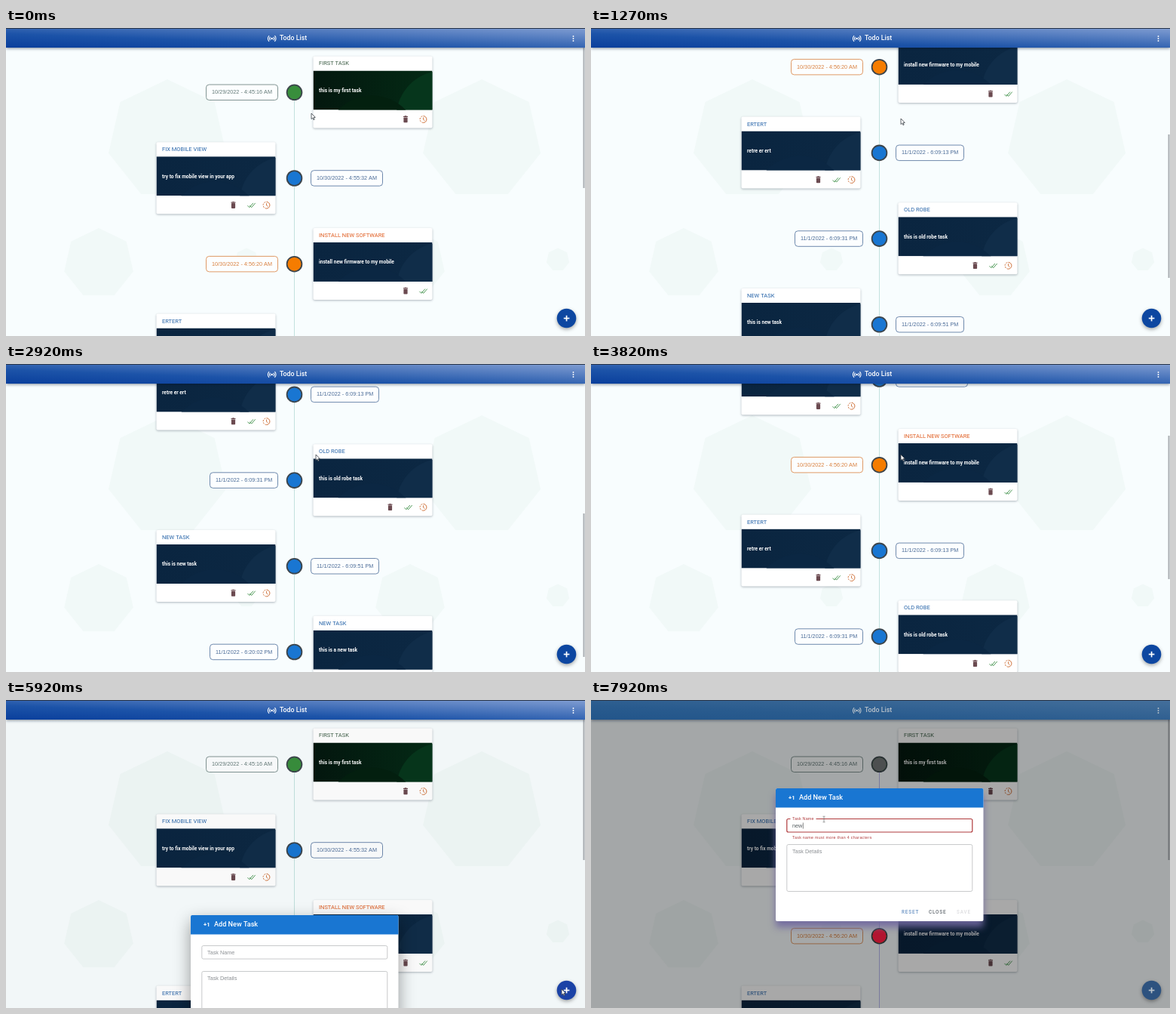
An HTML page with a canvas for the animation above (8 s loop, 768x408 px).

```html
<!DOCTYPE html>
<html lang="en">
<head>
<meta charset="utf-8">
<title>Todo List</title>
<style>
html, body { margin: 0; width: 100%; height: 100%; overflow: hidden; background: #f8fdfe; }
canvas { display: block; width: 768px; height: 408px; }
</style>
</head>
<body>
<canvas id="stage" width="768" height="408"></canvas>
<script>
const W = 768, H = 408, LOOP = 8000;
const ctx = document.getElementById('stage').getContext('2d');
const SANS = '"Liberation Sans", Arial, sans-serif';
const ROBOTO = 'Roboto, "Liberation Sans", sans-serif';

const GREEN = { dot: '#388e3c', title: '#3f5f48', date: '#647a78', dimDot: '#4d4f50' };
const BLUE = { dot: '#1976d2', title: '#2563a8', date: '#4c6c98', dimDot: '#1a4f86' };
const ORANGE = { dot: '#f57c00', title: '#df5a1d', date: '#d9803f', dimDot: '#b3142f' };

const TASKS = [
  { title: 'FIRST TASK', text: 'this is my first task', date: '10/29/2022 - 4:45:16 AM', hue: GREEN, icons: 'tc' },
  { title: 'FIX MOBILE VIEW', text: 'try to fix mobile view in your app', date: '10/30/2022 - 4:55:32 AM', hue: BLUE, icons: 'tdc' },
  { title: 'INSTALL NEW SOFTWARE', text: 'install new firmware to my mobile', date: '10/30/2022 - 4:56:20 AM', hue: ORANGE, icons: 'td' },
  { title: 'ERTERT', text: 'retre er ert', date: '11/1/2022 - 6:09:13 PM', hue: BLUE, icons: 'tdc' },
  { title: 'OLD ROBE', text: 'this is old robe task', date: '11/1/2022 - 6:09:31 PM', hue: BLUE, icons: 'tdc' },
  { title: 'NEW TASK', text: 'this is new task', date: '11/1/2022 - 6:09:51 PM', hue: BLUE, icons: 'tdc' },
  { title: 'NEW TASK', text: 'this is a new task', date: '11/1/2022 - 6:20:02 PM', hue: BLUE, icons: 'tdc' }
];

// [time, scroll offset, scrollbar lead]
const SCROLL = [[0, 0], [200, 36], [360, 80], [740, 105], [910, 152], [1090, 206], [1270, 261], [1440, 300],
  [1800, 362], [1980, 430], [2920, 386], [3290, 330], [3450, 265], [3820, 179, 19], [4100, 100, 20], [4380, 28, 28], [4930, 0]];
// [time, x, y]
const POINTER = [[0, 405, 113], [200, 411, 120], [5110, 470, 170], [5290, 590, 275], [5470, 695, 355],
  [5640, 737, 383], [6580, 640, 350], [6710, 510, 303], [7460, 309, 158]];
// [time, dialog top, backdrop opacity]
const DIALOG = [[0, H, 0], [5920, 285, 0.025], [6090, 145, 0.22], [6270, 117, 0.34]];

const stepAt = (list, t) => list.filter(row => row[0] <= t).pop();

function text(str, x, y, size, color, family = SANS, weight = 400, spacing = 0) {
  ctx.font = `${weight} ${size}px ${family}`;
  ctx.letterSpacing = spacing + 'px';
  ctx.fillStyle = color;
  ctx.fillText(str, x, y);
}

function rect(x, y, w, h, color) {
  ctx.fillStyle = color;
  ctx.fillRect(x, y, w, h);
}

function disc(x, y, r, color) {
  ctx.fillStyle = color;
  ctx.beginPath();
  ctx.arc(x, y, r, 0, 7);
  ctx.fill();
}

function rounded(x, y, w, h, r, fill, stroke, line = 1) {
  ctx.beginPath();
  ctx.roundRect(x, y, w, h, r);
  if (fill) { ctx.fillStyle = fill; ctx.fill(); }
  if (stroke) { ctx.strokeStyle = stroke; ctx.lineWidth = line; ctx.stroke(); }
}

function path(points, color, width) {
  ctx.beginPath();
  points.forEach(([x, y]) => ctx.lineTo(x, y));
  ctx.strokeStyle = color;
  ctx.lineWidth = width;
  ctx.stroke();
}

function withShadow(color, blur, dy, draw) {
  ctx.save();
  ctx.shadowColor = color;
  ctx.shadowBlur = blur;
  ctx.shadowOffsetY = dy;
  draw();
  ctx.restore();
}

function heptagon(cx, cy, r) {
  ctx.beginPath();
  for (let i = 0; i < 7; i++) {
    const a = i * Math.PI * 2 / 7;
    ctx.lineTo(cx + r * Math.sin(a), cy - r * Math.cos(a));
  }
  ctx.fillStyle = '#f1f9f8';
  ctx.fill();
}

function backdropShapes() {
  rect(0, 0, W, H, '#f8fdfe');
  for (const dx of [0, 413]) {
    heptagon(214 + dx + dx / 100, 148, 80);
    heptagon(123 + dx, 312, 47);
    heptagon(319 + dx, 307, 15.5);
  }
}

const ICONS = {
  t(x, y) {
    rect(x - 3, y - 4.2, 6, 1.2, '#6b4a50');
    rect(x - 1.2, y - 4.8, 2.4, 1, '#6b4a50');
    rounded(x - 2.6, y - 2.6, 5.2, 6.8, 0.8, '#6b4a50');
  },
  d(x, y) {
    path([[x - 5, y + 0.5], [x - 2.6, y + 3], [x + 2.4, y - 2.8]], '#4f9a58', 1);
    path([[x - 2.2, y + 0.5], [x + 0.2, y + 3], [x + 5.2, y - 2.8]], '#4f9a58', 1);
  },
  c(x, y) {
    ctx.strokeStyle = '#cf7038';
    ctx.lineWidth = 1;
    ctx.beginPath();
    ctx.arc(x, y, 4.4, -Math.PI / 2, Math.PI / 2);
    ctx.stroke();
    ctx.setLineDash([2, 1.4]);
    ctx.beginPath();
    ctx.arc(x, y, 4.4, Math.PI / 2, Math.PI * 1.5);
    ctx.stroke();
    ctx.setLineDash([]);
    path([[x, y - 2.6], [x, y + 0.3], [x + 2, y + 1.7]], '#cf7038', 0.9);
  }
};

function banner(x, y, green) {
  const [from, to, glow] = green ? ['#03170e', '#042a15', '#06361c'] : ['#0a2540', '#0c2843', '#102d49'];
  const fill = ctx.createLinearGradient(x, 0, x + 158, 0);
  fill.addColorStop(0, from);
  fill.addColorStop(1, to);
  ctx.save();
  ctx.beginPath();
  ctx.rect(x, y, 158, 52);
  ctx.clip();
  rect(x, y, 158, 52, fill);
  disc(x + 172, y + 62, 62, glow);
  disc(x + 78, y + 95, 62, green ? '#03200f' : '#0b2743');
  ctx.restore();
}

function task(item, index, scroll, dimmed) {
  const y = 85 + index * 113.7 - scroll;
  if (y < -60 || y > H + 60) return;
  const onRight = index % 2 === 0;
  const x = onRight ? 407.5 : 199.5;
  const { hue } = item;

  withShadow('rgba(0,20,40,.3)', 3, 1, () => rounded(x, y - 47.5, 158, 95, 2, '#fff'));
  text(item.title, x + 7.5, y - 37.8, 7.5, hue.title, ROBOTO);
  banner(x, y - 28.5, hue === GREEN);
  text(item.text, x + 7.5, y - 2, 6.6, '#fff', ROBOTO, 700);

  const offsets = item.icons.length === 3 ? [56, 32, 12] : [35.5, 12];
  [...item.icons].forEach((name, i) => ICONS[name](x + 158 - offsets[i], y + 36));

  const width = item.date.length > 22 ? 96 : 91;
  const left = onRight ? 361 - width : 404;
  rounded(left + 0.5, y - 10, width - 1, 20.5, 4, '#fcfeff', hue.date, 0.8);
  text(item.date, left + 8, y + 0.3, 7.27, hue.date);

  if (index < TASKS.length - 1) rect(382, y + 11, 1, 92, dimmed ? '#b9b9ee' : '#c3e2df');
  disc(382.5, y + 0.3, 10.8, '#3c454c');
  disc(382.5, y + 0.3, 9, hue.dot);
}

function header(dimmed) {
  const fill = ctx.createLinearGradient(383.1, 39, 384.9, -13);
  fill.addColorStop(0, dimmed ? '#22558a' : '#0a3f9c');
  fill.addColorStop(0.35, dimmed ? '#295b8e' : '#1c53a8');
  fill.addColorStop(1, dimmed ? '#446f9b' : '#809dd2');
  withShadow('rgba(0,20,50,.5)', 4, 1, () => rect(0, 0, W, 26, fill));
  rect(0, 0, W, 1, '#2b3648');

  const ink = dimmed ? '#b9c2ca' : '#fff';
  disc(352.7, 14, 1.3, ink);
  ctx.strokeStyle = ink;
  ctx.lineWidth = 1.1;
  for (const r of [3, 5.3]) for (const a of [0, Math.PI]) {
    ctx.beginPath();
    ctx.arc(352.7, 14, r, a - 0.8, a + 0.8);
    ctx.stroke();
  }
  text('Todo List', 363, 13.8, 8.8, ink, ROBOTO, 500);
  for (const y of [11, 14, 17]) disc(752.5, y, 0.95, ink);
}

function addButton(dimmed, hovered) {
  const ink = dimmed ? '#b9c2ca' : '#fff';
  const fill = dimmed ? '#2d527f' : hovered ? '#1b42a6' : '#0d47a1';
  withShadow('rgba(0,0,0,.35)', 5, 2, () => disc(743.5, 384.5, 12.8, fill));
  rect(739.8, 383.7, 7.6, 1.7, ink);
  rect(742.7, 380.8, 1.7, 7.6, ink);
}

function dialog(top, t, dimmed) {
  const x = 245;
  const focused = t >= 7460, failed = t >= 7640, explained = t >= 7920;
  const accent = failed ? '#b03a3c' : '#1976d2';

  withShadow(dimmed ? 'rgba(112,104,160,.9)' : 'rgba(0,0,0,.4)', dimmed ? 10 : 22, 8,
    () => rounded(x, top, 275.5, 176, 2, '#fff'));
  rounded(x, top, 275.5, 25.5, [2, 2, 0, 0], '#1976d2');
  text('+1', 262, top + 12.5, 7.6, '#fff', ROBOTO, 700);
  text('Add New Task', 276, top + 12.4, 9.1, '#fff', ROBOTO, 500);

  rounded(259.8, top + 40.5, 246, 17.5, 2, null, focused ? accent : '#c2c4c6', focused ? 1.2 : 0.9);
  if (focused) {
    rect(264.5, top + 38, 34, 5, '#fff');
    text('Task Name', 267, top + 40.3, 5.4, accent, SANS, 400, 0.2);
    const value = explained ? 'new' : failed ? 'n' : '';
    text(value, 267, top + 50, 7.3, '#555c60');
    rect(267.5 + ctx.measureText(value).width, top + 45.5, 0.7, 8, '#555');
  } else {
    text('Task Name', 267, top + 49.8, 7.25, '#8c9094');
  }
  if (explained) text('Task name must more than 4 characters', 267, top + 65.3, 5.3, '#b03a3c', SANS, 400, 0.3);

  rounded(259.8, top + 74.5, 246, 62, 2, null, '#c2c4c6', 0.9);
  text('Task Details', 267, top + 83.6, 7.3, '#8c9094');
  const button = (label, left, color) => text(label, left, top + 164.5, 6.3, color, ROBOTO, 500, 0.9);
  button('RESET', 412, '#6a93c4');
  button('CLOSE', 448, '#666d74');
  button('SAVE', 485, '#dcdcdf');
}

function pointer(x, y, typing) {
  if (typing) {
    path([[x, y - 3.5], [x, y + 3.5]], '#777', 0.8);
    path([[x - 1.5, y - 3.8], [x + 1.5, y - 3.8]], '#777', 0.7);
    path([[x - 1.5, y + 3.8], [x + 1.5, y + 3.8]], '#777', 0.7);
    return;
  }
  ctx.beginPath();
  [[0, 0], [0, 7.6], [1.8, 6], [3, 8.7], [4.2, 8.1], [3, 5.6], [5.3, 5.4]]
    .forEach(([dx, dy]) => ctx.lineTo(x + dx, y + dy));
  ctx.closePath();
  ctx.fillStyle = '#fff';
  ctx.fill();
  ctx.strokeStyle = '#3a4048';
  ctx.lineWidth = 0.8;
  ctx.stroke();
}

function render(t) {
  const [, scroll, lead = 0] = stepAt(SCROLL, t);
  const [, px, py] = stepAt(POINTER, t);
  const [, top, dim] = stepAt(DIALOG, t);
  const dimmed = dim > 0.1;

  ctx.textBaseline = 'middle';
  backdropShapes();
  TASKS.forEach((item, i) => task(item, i, scroll, dimmed));
  rect(765.5, 22 + 0.456 * (scroll - lead), 2, 190, '#a9aeb2');

  if (dim) rect(0, 0, W, H, `rgba(0,0,0,${dim})`);
  if (dimmed) TASKS.slice(0, 3).forEach((item, i) => disc(382.5, 85.3 + i * 113.7, 9, item.hue.dimDot));
  header(dimmed);
  addButton(dimmed, t >= 5640);
  if (top < H) dialog(top, t, dimmed);
  pointer(px, py, t >= 7460);
}

function tick() {
  render(performance.now() % LOOP);
  requestAnimationFrame(tick);
}
tick();
</script>
</body>
</html>
```
